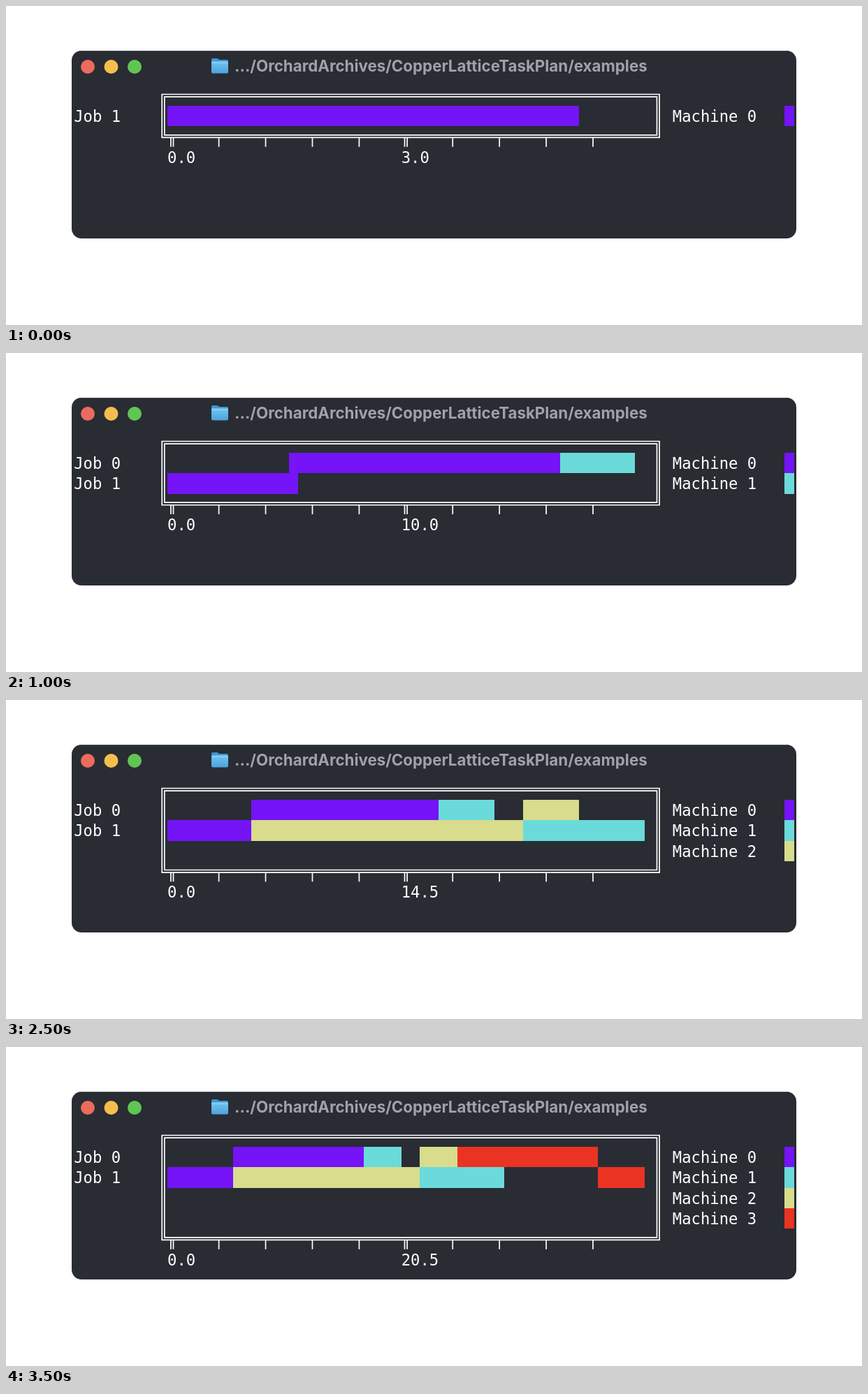
These frames come from a looping animation (1225 px wide and 457 px high, 4500 ms). An HTML page:

```html
<!DOCTYPE html>
<html lang="en">
<head>
<meta charset="utf-8">
<title>Job schedule</title>
<style>
  html, body { margin: 0; width: 100%; height: 100%; overflow: hidden; background: #fff; }
  svg { display: block; width: 100%; height: 100%; }
  #chart text { font: 22.23px "DejaVu Sans Mono", monospace; fill: #fff; white-space: pre; }
  #chart path { fill: none; stroke: #fff; stroke-width: 1.7; }
  .title { font: 700 22.3px Inter, sans-serif; fill: #a0a2a9; }
</style>
</head>
<body>
<svg viewBox="0 0 1225 457">
  <defs>
    <linearGradient id="folder" x2="0" y2="1">
      <stop offset="0" stop-color="#74c5f0"/>
      <stop offset="1" stop-color="#4ba3dc"/>
    </linearGradient>
  </defs>
  <rect x="94" y="64" width="1037" height="269" rx="14" fill="#292c33"/>
  <path d="M108 64.5H1117" stroke="#4b4e55" stroke-width="1"/>
  <circle cx="117" cy="87" r="10" fill="#ec6a5e"/>
  <circle cx="150.5" cy="87" r="10" fill="#f4be4f"/>
  <circle cx="184" cy="87" r="10" fill="#61c554"/>
  <path d="M294 77q0-2 2-2h6q1 0 2 1l1 1h11q2 0 2 2v6h-24z" fill="#3d94d2"/>
  <rect x="294" y="79" width="24" height="17.5" rx="2" fill="url(#folder)"/>
  <path d="M294.5 81.5h23" stroke="#92d6f6" stroke-width="1"/>
  <text class="title" x="327" y="94">.../OrchardArchives/CopperLatticeTaskPlan/examples</text>
  <g id="chart"></g>
</svg>
<script>
const chart = document.getElementById('chart');
const COLORS = ['#7414f7', '#6bdada', '#d8dc8c', '#eb3323'];
const CELL = 13.385, ROW = 29.33, LEFT = 231, TOP = 143;
const COLUMNS = 52, STEP = 500, LOOP = 4500;

// Scheduled in this order: job, machine, start, end
const TASKS = [
  [1, 0, 0, 5], [0, 0, 5, 16], [0, 1, 16, 19], [1, 2, 5, 21],
  [0, 2, 21, 24], [1, 1, 21, 28], [0, 3, 24, 36], [1, 3, 36, 40]
];

const colX = col => LEFT + col * CELL;
const rowY = row => TOP + row * ROW;
const label = (col, row, text) =>
  `<text x="${colX(col)}" y="${rowY(row) + 23}">${text}</text>`;
const block = (from, to, row, color) =>
  `<rect x="${colX(from)}" y="${rowY(row)}" width="${(to - from) * CELL}" height="${ROW}" ` +
  `fill="${color}" shape-rendering="crispEdges"/>`;

function frame(rows) {
  const bottom = rowY(rows) + 14.3;
  const ring = d => `M${225 - d} ${128.3 - d}H${933.3 + d}V${bottom + d}H${225 - d}Z`;
  let path = ring(1.8) + ring(-1.8);
  for (let i = 0; i < 10; i++) {
    const x = colX(i * 5 + 0.5);
    for (const dx of i % 5 ? [0] : [-1.8, 1.8]) {
      path += `M${x + dx} ${bottom + 1.8}V${rowY(rows + 1)}`;
    }
  }
  return `<path d="${path}"/>`;
}

function draw(step) {
  const tasks = TASKS.slice(0, step + 1);
  const unique = i => [...new Set(tasks.map(task => task[i]))].sort();
  const jobs = unique(0), machines = unique(1);
  const rows = Math.max(jobs.length, machines.length);
  const span = Math.max(...tasks.map(task => task[3])) + 1;
  const scale = t => t * COLUMNS / span;

  let out = frame(rows);
  for (const [job, machine, start, end] of tasks) {
    out += block(Math.ceil(scale(start)), Math.floor(scale(end)) + 1,
      jobs.indexOf(job), COLORS[machine]);
  }
  jobs.forEach((job, row) => { out += label(-10, row, 'Job ' + job); });
  machines.forEach((machine, row) => {
    out += label(54, row, 'Machine ' + machine) + block(66, 67, row, COLORS[machine]);
  });
  out += label(0, rows + 1, '0.0') + label(25, rows + 1, (span / 2).toFixed(1));
  chart.innerHTML = out;
}

const origin = performance.now();
let shown = -1;
function tick() {
  const time = (performance.now() - origin) % LOOP;
  const step = Math.min(Math.floor(time / STEP), TASKS.length - 1);
  if (step !== shown) draw(shown = step);
  requestAnimationFrame(tick);
}
tick();
</script>
</body>
</html>
```
